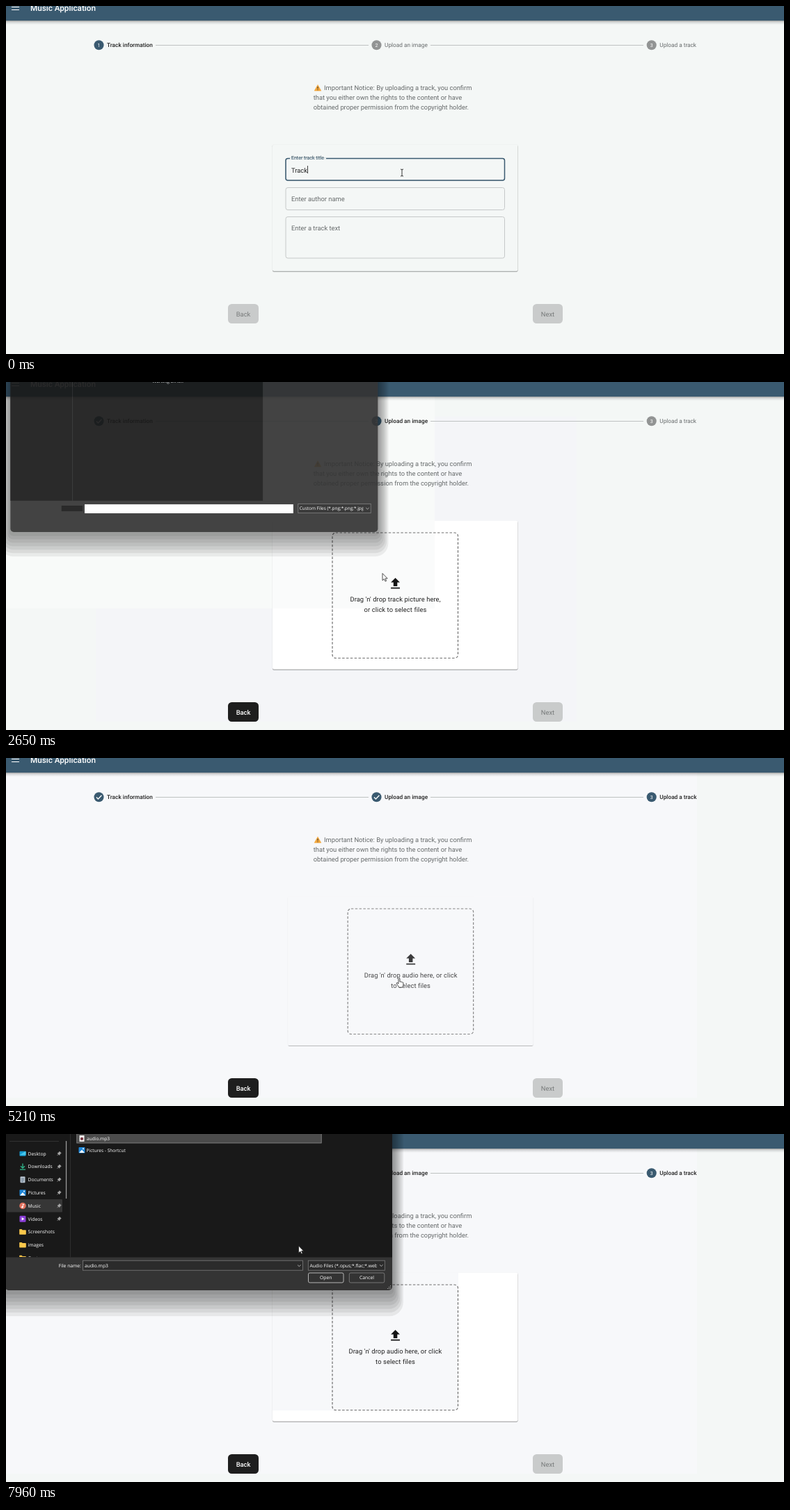
An HTML page for the animation above (8000 ms loop, 1118x501 px).

```html
<!DOCTYPE html>
<html lang="en">
<head>
<meta charset="utf-8">
<title>Track upload</title>
<style>
  html, body { margin: 0; width: 100%; height: 100%; overflow: hidden; background: #f4f7f6; }
  #stage { display: block; width: 1118px; height: 501px; font: 9.36px Roboto, sans-serif; text-rendering: geometricPrecision; }
  .title { font-size: 11.7px; font-weight: 500; fill: #fff; }
  .soft { fill: #666a6b; }
  .dark { fill: #222; }
  .step { font-size: 8.25px; }
  .num { font-size: 7px; fill: #fff; text-anchor: middle; }
  .med { font-weight: 500; }
  .mid { text-anchor: middle; }
  .small { font-size: 7.02px; }
  .box { fill: none; stroke: #c6c9c9; }
  .focus { fill: none; stroke: #3a5a70; stroke-width: 1.5; }
  .drop { letter-spacing: .09px; text-anchor: middle; fill: #222; }
  .dialog { font: 6.75px "Open Sans", "Noto Sans", sans-serif; fill: #fff; }
  .files { font-size: 6.58px; }
  .ctl { fill: #2b2b2b; stroke: #7d7d7d; stroke-width: .8; }
  .chev { fill: none; stroke: #ccc; stroke-width: .8; }
</style>
</head>
<body>
<svg id="stage" viewBox="0 0 1118 501">
  <defs>
    <linearGradient id="shade" x2="0" y2="1"><stop stop-opacity=".34"/><stop offset=".4" stop-opacity=".12"/><stop offset="1" stop-opacity="0"/></linearGradient>
    <g id="desktop"><rect x="-4.5" y="-3.5" width="9" height="7" rx="1" fill="#1599cf"/><path d="M-4.5 2L4.5-3.5V2z" fill="#48c9ee"/></g>
    <path id="downloads" d="M0-4.5V2M-3-.8L0 2.2 3-.8M-4 4.2H4" fill="none" stroke="#2fb78c" stroke-width="1.3"/>
    <g id="documents"><rect x="-3.5" y="-4.5" width="7" height="9" rx="1" fill="#b4c0cc"/><path d="M-2-1.5H2M-2 .5H2M-2 2.5H1" stroke="#52677c" stroke-width=".8"/></g>
    <g id="pictures"><rect x="-4.5" y="-4.3" width="9" height="8.6" rx="1" fill="#1d86d8"/><path d="M-4 3.8L0-.6 4 3.8z" fill="#fff"/><circle cx="2" cy="-2" r="1" fill="#fff"/></g>
    <g id="music"><circle r="4.7" fill="#e2725f"/><path d="M.3 2V-2.4L2-1.6" fill="none" stroke="#fff"/><circle cx="-.6" cy="1.9" r="1.2" fill="#fff"/></g>
    <g id="videos"><rect x="-4.5" y="-4.5" width="9" height="9" rx="1.2" fill="#8a3fd6"/><path d="M-1.4-2.2L2.4 0-1.4 2.2z" fill="#fff"/></g>
    <path id="folder" d="M-4.8-3.2q0-.7.7-.7h2.6l1.2 1.2h4.4q.7 0 .7.7v5q0 .7-.7.7h-8.2q-.7 0-.7-.7z" fill="#fbc84b"/>
    <circle id="vault" r="4.3" fill="#1a86d9"/>
    <g id="image"><path d="M-3.5-4.5H1.6L3.5-2.6V4.5H-3.5z" fill="#eef2f5"/><rect x="-2.3" y="-1.6" width="4.6" height="4.3" fill="#1b7fca"/></g>
    <g id="audio"><rect x="-3.5" y="-4.5" width="7" height="9" fill="#f0eeee"/><circle r="2.1" cy=".4" fill="#74303c"/></g>
    <path id="pin" d="M.6-2.9L2.9-.6 1.2.5.5 2.2-2.2-.5-.5-1.2zM-.8.8L-2.8 2.8" fill="#a8a8a8" stroke="#a8a8a8" stroke-width=".7"/>
    <path id="upload" transform="translate(548.5 279.2) scale(.92)" d="M5 20h14v-2H5v2zm0-10h4v6h6v-6h4l-7-7-7 7z" fill="#151515"/>
  </defs>
  <g id="page"></g>
  <g id="dialog" class="dialog"></g>
  <g id="cursor">
    <path data-on="0-1560" d="M-2-5Q0-5 0-4Q0-5 2-5M0-4.5V4.5M-2 5Q0 5 0 4Q0 5 2 5" fill="none" stroke="#222" stroke-width=".9"/>
    <path data-on="1560-2500 2640-4600 4900-5150 5700-8000" d="M0 0v10.2l2.4-2.2 1.6 3.5 1.6-.7-1.6-3.4h3.2z" fill="#fff" stroke="#222" stroke-width=".8"/>
    <path data-on="2500-2640 4600-4900 5150-5700" d="M-1 1q0-1 1-1t1 1v4.2q1.3-.8 1.8.3 1.2-.6 1.7.5 1.4-.4 1.4 1v2.5q0 2.2-1.4 3.7H-.4Q-2 10-3.6 8q-.6-1.2.5-1.5Q-2 6.5-1 8z" fill="#fff" stroke="#222" stroke-width=".8"/>
  </g>
</svg>
<script>
const LOOP = 8000;
const $ = id => document.getElementById(id);

// markup helpers
const text = (x, y, s, cls = '') => `<text x="${x}" y="${y}" class="${cls}">${s}</text>`;
const rect = (x, y, w, h, more = '') => `<rect x="${x}" y="${y}" width="${w}" height="${h}" ${more}/>`;
const icon = (id, x, y) => `<use href="#${id}" x="${x}" y="${y}"/>`;
const on = (when, s) => `<g data-on="${when}">${s}</g>`;
const clip = (x, y, w, h, s) =>
  `<svg x="${x}" y="${y}" width="${w}" height="${h}" viewBox="${x} ${y} ${w} ${h}">${s}</svg>`;

function step(n, x, label, active, done) {
  const state = (from, to, fill, mark, cls) => on(`${from}-${to}`,
    `<circle cx="${x}" cy="56.3" r="7" fill="${fill}"/>${mark}${text(x + 11.6, 59.2, label, 'step ' + cls)}`);
  const num = text(x, 58.8, n, 'num');
  const tick = `<path d="M${x - 3.6} 56.5l2.5 2.5 5-5.2" fill="none" stroke="#fff" stroke-width="1.3"/>`;
  return state(0, active, '#929494', num, 'soft')
    + state(active, done, '#3a5a70', num, 'med dark')
    + state(done, LOOP, '#3a5a70', tick, 'med dark');
}

function button(x, w, label, enabled) {
  const draw = (fill, ink, weight) => rect(x, 429, w, 28, `rx="5.500" fill="${fill}"`)
    + `<text x="${x + w / 2}" y="446.5" class="mid" fill="${ink}" font-weight="${weight}">${label}</text>`;
  return draw('#c9cbcb', '#777a7a', 400) + on(enabled, draw('#1e1e1e', '#fff', 500));
}

function field(y, h, label, raised, focused) {
  const base = rect(402, y, 314.5, h, 'rx="3" class="box"');
  const notch = rect(408, y - 1, 52, 2.2, 'fill="#f4f7f6"');
  if (!raised) return base + text(410, y + 19.7, label, 'soft');
  const [from] = raised.split('-');
  return base + on(`0-${from}`, text(410, y + 19.7, label, 'soft'))
    + on(raised, notch + text(410, y + 1.7, label, 'small soft'))
    + on(focused, rect(402, y, 314.5, h, 'rx="3" class="focus"') + notch
      + `<text x="410" y="${y + 1.7}" class="small" fill="#3a5a70">${label}</text>`);
}

// white or tinted sheet with a thin shadow under it
const card = (h, fill) =>
  rect(383, 200.5, 352.5, h, 'rx="2" fill="#000" opacity=".38"')
  + rect(382.5, 199.5, 353.5, h, 'rx="2" fill="#000" opacity=".07"')
  + rect(383, 199.5, 352.5, h, `rx="2" fill="${fill}"`);

function dropCard(line1, line2, tint) {
  return card(214.2, '#fff') + tint
    + rect(469, 217, 180.5, 180.5, 'rx="4.7" fill="none" stroke="#6f6f6f" stroke-width="1.2" stroke-dasharray="3.5 2.35"')
    + '<use href="#upload"/>' + text(559.5, 316, line1, 'drop') + text(559.5, 330.6, line2, 'drop');
}

$('page').innerHTML =
  on('1900-4900', rect(129, 50, 691, 439, 'fill="#f4f5f8"'))
  + on('2640-4900', rect(0, 0, 616, 326, 'fill="#f8faf9"'))
  + on('4900-8000', rect(0, 0, 993, 489, 'fill="#f7f8fa"'))
  + rect(0, 0, 1118, 21, 'fill="#3a5a70"') + rect(0, 21, 1118, 6, 'fill="url(#shade)"')
  + '<path d="M8 1.5h11M8 5.5h11" stroke="#fff" stroke-width="1.2"/>'
  + text(35, 7, 'Music Application', 'title')
  + '<path d="M215 56.5H521M610 56.5H916" stroke="#bfc2c2"/>'
  + step(1, 133.5, 'Track information', 0, 1800)
  + step(2, 532.5, 'Upload an image', 2060, 4900)
  + step(3, 927.7, 'Upload a track', 4900, LOOP)
  + '<path d="M448 113.5l4.8 8.6h-9.6z" fill="#f3a73c" stroke="#f3a73c" stroke-width=".6" stroke-linejoin="round"/>'
  + '<path d="M448 116v3.2m0 1v1" stroke="#333" stroke-width="1"/>'
  + text(457, 121, 'Important Notice: By uploading a track, you confirm', 'soft')
  + text(441.7, 135, 'that you either own the rights to the content or have', 'soft')
  + text(441.7, 149, 'obtained proper permission from the copyright holder.', 'soft')
  + '<g id="form">'
  + card(182.2, '#f4f7f6')
  + field(219.5, 31.5, 'Enter track title', '0-8000', '0-400')
  + field(261.5, 32, 'Enter author name', '400-8000', '400-8000')
  + field(303.5, 59.5, 'Enter a track text')
  + text(410, 239.5, 'Track', 'dark')
  + on('0-400', rect(433.2, 230, .8, 11, 'fill="#111"'))
  + on('400-980', rect(410, 272, .8, 11, 'fill="#111"'))
  + on('980-1130', text(410, 281.2, 'Auth', 'dark'))
  + on('1130-8000', text(410, 281.2, 'Author', 'dark'))
  + '</g><g id="picture">'
  + dropCard("Drag 'n' drop track picture here,", 'or click to select files',
      on('2640-4900', rect(383, 199.5, 233, 126.5, 'fill="#fafbfb"')))
  + '</g><g id="track">'
  + dropCard("Drag 'n' drop audio here, or click", 'to select files',
      rect(383, 199.5, 267, 198.5, 'fill="#f7f8fa"')
      + on('4900-5300', rect(383, 199.5, 352.5, 214.2, 'fill="#f7f8fa"')))
  + '</g><g id="buttons">'
  + button(319, 44, 'Back', '2060-8000')
  + button(757, 43, 'Next', '980-2060 4550-4900')
  + '</g>';

// file dialog
const row = (id, y, label, pinned) => icon(id, 24, y) + text(31.6, y + 2.4, label) + (pinned ? icon('pin', 76.3, y) : '');
const places = ['Desktop', 'Downloads', 'Documents', 'Pictures', 'Music', 'Videos', 'Screenshots', 'images', 'Custom'];
const sidebar = rect(0, -18.6, 81, 18.2, 'rx="1" fill="#353535"')
  + '<path class="chev" d="M8-12l2.4 2.4L8-7.2"/>'
  + row('pictures', -28.9, 'Gallery') + row('vault', -9.6, 'Vaultory - Personal')
  + rect(5, 10, 71, .7, 'fill="#3d3d3d"')
  + on('6830-8000', rect(1, 94, 80, 18.5, 'rx="1" fill="#363636"'))
  + places.map((p, i) => row(i < 6 ? p.toLowerCase() : 'folder', 28.2 + 18.8 * i, p, i < 6)).join('');

const file = (id, x, r, name) => icon(id, x, 10.7 + 19.4 * r) + text(x + 6.1, 13 + 19.4 * r, name);
const shared = ['ChatGPT Image 29. 6. 2025, 19', 'Generic avatar.png', 'akame-ga-kill-tenor-desktop-',
  'thumb-1920-1061723.jpg', 'akame-ga-kill-tenor-desktop-', 'hiclipart.com.png'];
const images = on('3400-4150', rect(102, 20.5, 109, 19, 'fill="#333"'))
  + file('image', 125, 0, 'beach-1834648_1280.jpg') + file('image', 125, 1, 'bridge-3013297_1280.jpg')
  + file('folder', 235, 0, 'Telegram Desktop') + file('folder', 324.5, 1, 'trclub_12_06_2024')
  + file('image', 324.8, 0, '5a2411fc6003f508dd5d5b37.png')
  + shared.map((name, r) => file('image', 457, r, name)).join('')
  + rect(104, 171.6, 110, 1.4, 'rx=".7" fill="#9a9a9a"');
const sounds = on('7650-8000', rect(101.8, -6, 351.4, 19, 'fill="#4b4b4b" stroke="#8c8c8c" stroke-width=".8"'))
  + icon('audio', 109, 6.5) + text(116, 9, 'audio.mp3')
  + icon('pictures', 109, 23.3) + text(115.6, 25.8, 'Pictures - Shortcut');

const types = s => clip(434, 180, 99, 18, text(436.4, 191.7, s));
const fileType = on('2640-4150', types('Custom Files (*.png;*.png;*.jpg')) + on('5640-8000', types('Audio Files (*.opus;*.flac;*.webm'));
const push = (x, label, stroke) => rect(x, 200, 50.5, 14, `rx="2" fill="#333" stroke="${stroke}" stroke-width=".9"`)
  + text(x + 25.2, 209.4, label, 'mid');

// stepped shadow: wide below, narrow at the sides
const shadow = Array.from({ length: 7 }, (_, k) => {
  const side = 2 + 2.3 * k;
  return rect(-1.4 - side, -40, 556.4 + 2 * side, 271 + 5.2 * k, `rx="${6 + 2.3 * k}" fill="#000" opacity=".07"`);
}).join('');

$('dialog').innerHTML =
  shadow
  + rect(-1.4, -30, 556.4, 255, 'rx="5" fill="#343434"')
  + on('2640-2700 5640-5700',
      rect(-1.4, -30, 382.2, 207.5, 'fill="#191919"') + rect(76, 185, 32, 8.5, 'fill="#191919"')
      + rect(111, 183, 316, 13.6, 'fill="#fff"') + text(237, -1.2, 'Working on it...', 'mid'))
  + on('2700-4150 5700-8000',
      rect(-1.4, -30, 556.4, 207.5, 'fill="#191919"')
      + clip(-1, -20, 83, 197, `<g id="places">${sidebar}</g>`)
      + rect(85.9, 10, 1.3, 83, 'rx=".6" fill="#9a9a9a"')
      + clip(93, -20, 462, 197, `<g class="files">${on('2860-4150', images)}${on('7150-8000', sounds)}</g>`)
      + text(75.7, 191.7, 'File name:')
      + rect(110.5, 182.2, 316, 14, 'class="ctl"')
      + '<path class="chev" d="M419 188.5l2.3 2.2 2.3-2.2"/>'
      + on('2700-3400 5700-7650', rect(110.5, 182.2, 316, 14, 'fill="none" stroke="#ddd" stroke-width=".8"')
        + rect(113, 184.5, .6, 9.5, 'fill="#fff"'))
      + on('3400-4150', rect(112.5, 184.5, 77.5, 9.8, 'fill="#0b72c9"')
        + `<g class="files">${text(113, 191.7, 'bridge-3013297_1280.jpg')}</g>`)
      + on('7650-8000', text(113, 191.7, 'audio.mp3'))
      + push(434.5, 'Open', '#c4c4c4')
      + on('3960-4150', rect(435, 200.5, 49.5, 13, 'rx="2" fill="#505050"') + text(459.7, 209.4, 'Open', 'mid'))
      + push(493.3, 'Cancel', '#7d7d7d')
      + '<path d="M548 222.5h1m1 0h1m1 0h1m-3-2h1m1 0h1m-1-2h1" stroke="#aaa"/>')
  + rect(92.2, -30, .8, 207.5, 'fill="#333"')
  + rect(434.3, 182.2, 110, 14, 'class="ctl"') + fileType
  + '<path class="chev" d="M537 188.2l2.3 2.2 2.3-2.2"/>';

// bursts of change: start, end, number of steps
const bursts = [[0, 0, 1], [280, 700, 4], [990, 1140, 2], [1570, 2530, 8], [2650, 3610, 8],
  [3740, 4760, 8], [4910, 5950, 8], [6090, 7040, 8], [7160, 7960, 7]];

function snap(t) {
  const [start, end, n] = bursts.findLast(b => b[0] <= t);
  if (n < 2) return start;
  const gap = (end - start) / (n - 1);
  return start + gap * Math.min(n - 1, Math.floor((t - start + 25) / gap));
}

// pointer waypoints: time, x, y
const path = [[0, 569, 240], [420, 565, 277], [700, 560, 340], [1140, 560, 340], [1707, 783, 448], [2119, 782.5, 448],
  [2530, 541, 275.5], [2650, 541, 275.5], [3061, 300, 100], [3336, 168, 30], [3610, 168, 30], [3886, 430, 195],
  [4031, 453.5, 205], [4177, 453.5, 205], [4614, 778, 470], [4760, 778, 470], [5059, 650, 380], [5207, 565, 317],
  [5356, 540, 290], [5653, 476, 268], [5801, 473.5, 267], [5950, 362, 230], [6361, 150, 120], [6904, 45, 103],
  [7160, 45, 103], [7560, 430, 7], [7693, 430, 7], [7960, 420.5, 161]];

function pointer(t) {
  const i = path.findLastIndex(p => p[0] <= t), a = path[i], b = path[i + 1] || a;
  const k = b === a ? 0 : (t - a[0]) / (b[0] - a[0]);
  return [a[1] + (b[1] - a[1]) * k, a[2] + (b[2] - a[2]) * k];
}

const CARD = 353;
// a card slides in from the right at `enter` and leaves to the left at `leave`
function slide(el, t, enter, leave) {
  const p = Math.max(0, (t - leave) / 120);
  const x = p > 0 ? -CARD * p * p : CARD * Math.exp(-(t - enter) / 60);
  el.style.display = t >= enter && p < 1 ? '' : 'none';
  el.setAttribute('transform', `translate(${x.toFixed(2)} 0)`);
  el.setAttribute('opacity', p > 0 ? 1 - p : Math.max(0, 1 - x / CARD) ** 3);
}

const timed = [...document.querySelectorAll('[data-on]')].map(el =>
  [el, el.dataset.on.split(' ').map(r => r.split('-').map(Number))]);
const parts = Object.fromEntries(['form', 'picture', 'track', 'buttons', 'dialog', 'places', 'cursor'].map(id => [id, $(id)]));

function draw(t) {
  for (const [el, spans] of timed)
    el.style.display = spans.some(([a, b]) => t >= a && t < b) ? '' : 'none';

  slide(parts.form, t, -2000, 1800);
  slide(parts.picture, t, 1940, 4880);
  slide(parts.track, t, 5041, 9000);
  parts.buttons.setAttribute('transform', `translate(0 ${t < 1900 ? 0 : 32})`);

  const age = t - (t < 5000 ? 2650 : 5653);
  const s = age > 250 ? 1 : 1 - .051 * Math.exp(-age / 135);
  parts.dialog.style.display = age > -1 && (t < 4150 || t > 5640) ? '' : 'none';
  parts.dialog.setAttribute('transform', `translate(150 48) scale(${s}) translate(-150 -48)`);
  parts.dialog.setAttribute('opacity', age < 60 ? .92 : 1);
  parts.places.setAttribute('transform', `translate(0 ${age < 250 ? 41.3 : 0})`);

  parts.cursor.setAttribute('transform', `translate(${pointer(t)})`);
}

let begin;
function tick(now) {
  begin ??= now;
  draw(snap((now - begin) % LOOP));
  requestAnimationFrame(tick);
}
draw(0);
requestAnimationFrame(tick);
</script>
</body>
</html>
```
